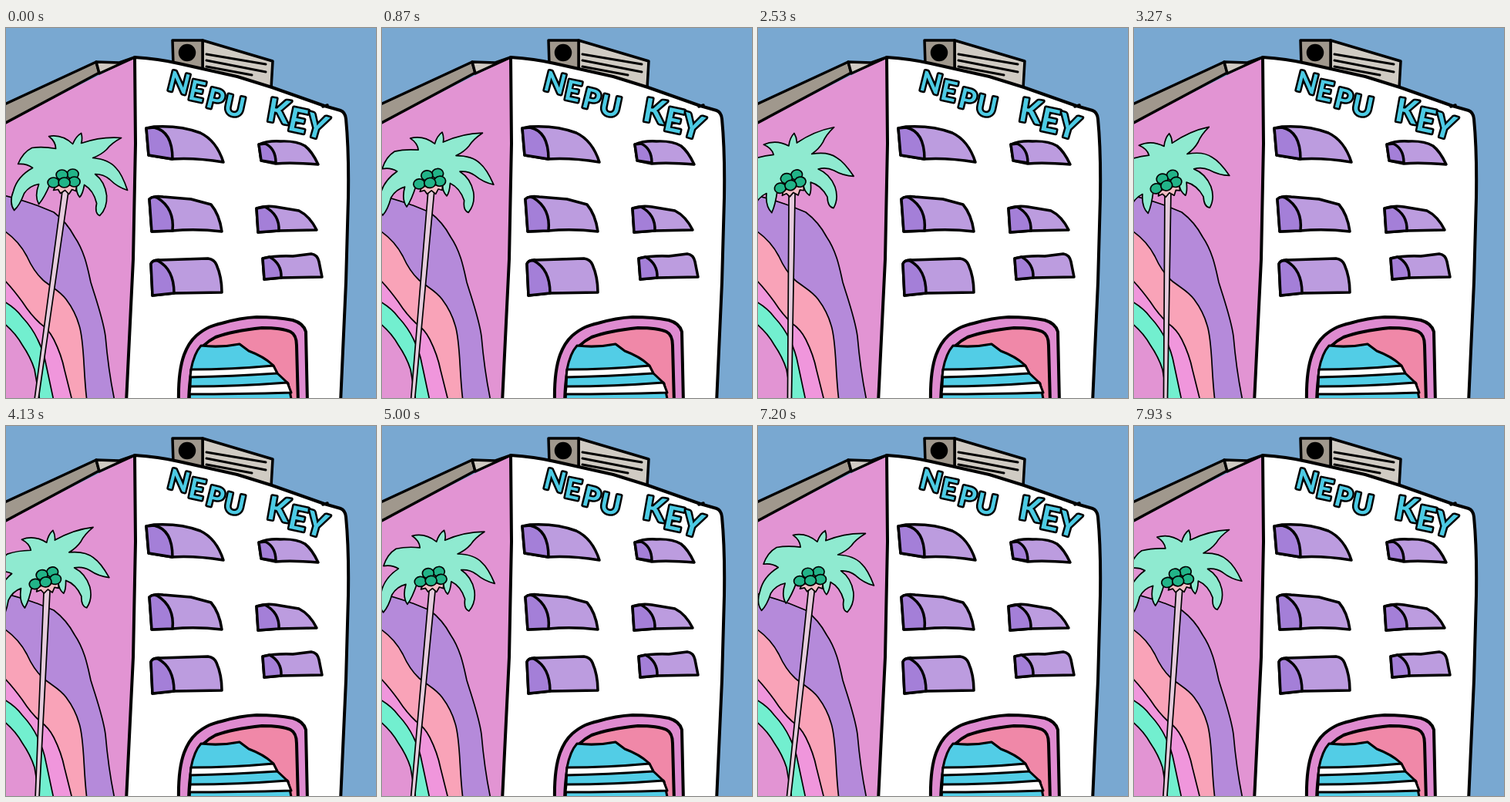
These frames come from a looping animation (480 by 480 pixels, 8 s). An HTML page:

```html
<!DOCTYPE html>
<html lang="en">
<head>
<meta charset="utf-8">
<title>Hotel with swaying palm</title>
<style>
  html, body { margin: 0; width: 100%; height: 100%; overflow: hidden; background: #79a8d1; }
  svg { display: block; width: 100vw; height: 100vh; }
  .ink { stroke: #000; stroke-linejoin: round; stroke-linecap: round; }
  .bold { stroke-width: 4; }
  .mid { stroke-width: 3.5; }
  .thin { stroke-width: 1.7; }
  .line { fill: none; }
  .sign { font-family: Lato, "Open Sans", sans-serif; font-weight: 700; fill: #4ccbe4;
          stroke-width: 5; paint-order: stroke; }
</style>
</head>
<body>
<svg viewBox="0 0 480 480">
  <rect width="480" height="480" fill="#79a8d1"/>

  <!-- side wall and its painted bands -->
  <path fill="#e294d3" d="M0 122L167 38L169 150L157 480H0Z"/>
  <g class="ink thin">
    <path fill="#b58ada" d="M-4 217C14 221 28 226 40 230L62 239Q79 252 89 271C102 290 106 312 110 330C118 356 126 378 129 400Q133 446 141 484H-4Z"/>
    <path fill="#f9a3b8" d="M-4 262Q16 275 27 296Q36 316 48 327C60 337 70 341 78 352Q90 368 95 386C102 408 100 446 105 484H-4Z"/>
    <path fill="#f096dc" d="M-4 325Q8 337 21 355Q32 372 44 383C54 390 58 396 62 404Q72 424 76 444L86 484H-4Z"/>
    <path fill="#72efcf" d="M-4 354Q12 363 21 375Q34 389 41 404Q49 420 52 437L62 484H-4Z"/>
    <path fill="#e294d3" d="M-4 382Q12 395 21 411Q32 427 37 443L44 484H-4Z"/>
  </g>

  <!-- roof -->
  <g class="ink mid">
    <path fill="#a0988d" d="M-4 100L117 44L121 58L-4 125Z"/>
    <path fill="#d0cbc3" d="M117 44L147 45L167 38L121 59Z"/>
    <path fill="#d0cbc3" d="M255 16L346 43L344 78L255 56Z"/>
    <path fill="#a0988d" d="M216 16L255 16L255 56L217 48Z"/>
    <path class="line" stroke-width="3" d="M260 34L337 47M260 42L337 57M260 50L319 61"/>
    <ellipse cx="235" cy="32" rx="9.5" ry="9.5"/>
  </g>

  <!-- front wall -->
  <path class="ink bold" fill="#fff" d="M167 38Q198 40 224 46L300 63L345 77L413 101L434 107Q440 109 441 118Q445 160 444 220L441 330L434 486H156L165 300L168 150Z"/>
  <path class="ink mid line" d="M411 102L417 100"/>
  <g class="ink sign">
    <text font-size="36" x="208 235 258 281" y="80 92 102 111" rotate="14 12 14 12">NEPU</text>
    <text font-size="42" x="337 364 386" y="120 132 138" rotate="10 12 16">KEY</text>
  </g>
  <g id="windows" class="ink mid"></g>

  <!-- entrance -->
  <g class="ink bold">
    <path fill="#df8bd0" d="M224 486Q223 446 231 424Q237 408 247 399C260 388 268 386 280 383Q304 376 325 375Q352 375 372 379Q386 383 389 394L391 486Z"/>
    <path fill="#f088a8" d="M237 486Q238 444 246 427Q254 410 272 401Q294 393 332 389Q358 389 369 394Q377 398 377 412L379 486Z"/>
    <g stroke-width="3">
      <path fill="#52cde6" d="M240 443Q244 422 253 412Q278 415 303 410L315 419Q334 426 346 437L352 448L366 461L371 486H238Z"/>
      <path fill="#fff" d="M240 443Q292 443 347 438L352 448Q292 452 239 453Z"/>
      <path fill="#fff" d="M239 465Q300 465 365 460L370 473Q300 475 238 475Z"/>
    </g>
  </g>

  <!-- palm -->
  <g id="fronds" class="ink thin">
    <path fill="#8fead0" d="M56 141Q73 138 87 151Q91 141 98 137Q100 144 98 150Q124 141 150 143Q137 150 131 158Q124 165 113 169Q134 171 143 182Q151 190 158 211Q145 207 135 197Q127 190 116 190Q129 200 131 218Q132 234 122 244Q115 241 118 228Q114 211 102 204Q100 216 96 220Q91 214 92 205L58 202Q50 221 43 229Q37 219 43 203Q31 205 24 215Q18 231 11 237Q4 227 10 212Q15 193 35 182Q27 176 16 177Q22 162 34 156Q48 154 65 157Q65 148 56 141Z"/>
  </g>
  <path id="trunk" class="ink thin" fill="#e5cbdc"/>
  <g id="nuts" class="ink thin">
    <path fill="#f3bcc4" d="M65 205L62 211L68 210L71 215L77 211L82 216L86 210L91 212L92 204Z"/>
  </g>
</svg>
<script>
const svgNS = "http://www.w3.org/2000/svg";
const byId = id => document.getElementById(id);
function add(parent, tag, attrs) {
  const node = document.createElementNS(svgNS, tag);
  for (const key in attrs) node.setAttribute(key, attrs[key]);
  parent.append(node);
}

// Each awning: whole outline, then the darker end panel.
const awnings = [
  ["M182 130L192 128Q226 126 252 136Q273 146 282 174Q245 168 215 170L185 165Z",
   "M182 130L192 129Q216 134 216 170L185 165Z"],
  ["M328 151Q340 146 356 147Q376 146 388 153Q397 160 405 177Q370 174 350 176L331 172Z",
   "M328 151L336 150Q350 156 350 175L331 172Z"],
  ["M186 222Q192 217 204 219L240 222L266 229Q277 242 280 264Q246 260 216 263L189 264Z",
   "M186 222Q190 218 196 220Q219 234 216 263L189 264Z"],
  ["M325 234Q336 230 350 232L380 237Q394 244 403 262L354 263L327 265Z",
   "M325 234L336 232Q355 242 354 263L327 265Z"],
  ["M188 306Q191 300 200 301L262 299Q270 300 273 307Q280 323 280 343L218 344L190 347Z",
   "M188 306Q190 301 197 302Q218 313 218 344L190 347Z"],
  ["M333 299Q350 295 372 296L396 293Q404 294 406 303L410 323L357 324L335 326Z",
   "M333 299L342 297Q358 306 357 324L335 326Z"]
];
for (const [whole, end] of awnings) {
  add(byId("windows"), "path", { d: whole, fill: "#bc9cdf" });
  add(byId("windows"), "path", { d: end, fill: "#a47fd8" });
}
for (const [cx, cy] of [[87, 190], [73, 191], [89, 200], [62, 201], [76, 201]])
  add(byId("nuts"), "ellipse", { cx, cy, rx: 7.5, ry: 6.5, fill: "#22b488" });

// Sway: time in ms, crown x, crown tilt in degrees.
const sway = [
  [-250, 76, 0], [0, 75.6, 0], [1800, 48, -11.5], [2700, 41, -16], [3270, 42, -16],
  [5000, 63.6, -4.5], [5800, 74.3, -0.7], [6250, 75.8, 0], [7200, 68, -2.5],
  [7930, 56, -7.5], [8100, 53.5, -8.8]
];
const slope = (i, k) => {
  const a = sway[Math.max(i - 1, 0)], b = sway[Math.min(i + 1, sway.length - 1)];
  return (b[k] - a[k]) / (b[0] - a[0]);
};
function swayAt(t, k) {
  const j = sway.findIndex(p => p[0] > t), i = j - 1;
  const span = sway[j][0] - sway[i][0], u = (t - sway[i][0]) / span;
  const s = u * u * (3 - 2 * u);
  return sway[i][k] * (1 - s) + sway[j][k] * s
    + span * u * (1 - u) * ((1 - u) * slope(i, k) - u * slope(j, k));
}

const loop = 8000, step = 1000 / 15;
function draw(now) {
  const t = Math.floor((now % loop) / step + 0.01) * step;
  const x = swayAt(t, 1), tilt = swayAt(t, 2), y = 199.5 + tilt * tilt / 64;
  const move = `translate(${x} ${y}) rotate(${tilt}) translate(-76 -200)`;
  const foot = 43 - x / 20;
  byId("fronds").setAttribute("transform", move);
  byId("nuts").setAttribute("transform", move);
  byId("trunk").setAttribute("d", `M${x - 2} ${y + 8}H${x + 6}L${foot + 2.5} 484H${foot - 2.5}Z`);
}
const start = performance.now();
function tick() {
  draw(performance.now() - start);
  requestAnimationFrame(tick);
}
tick();
</script>
</body>
</html>
```
